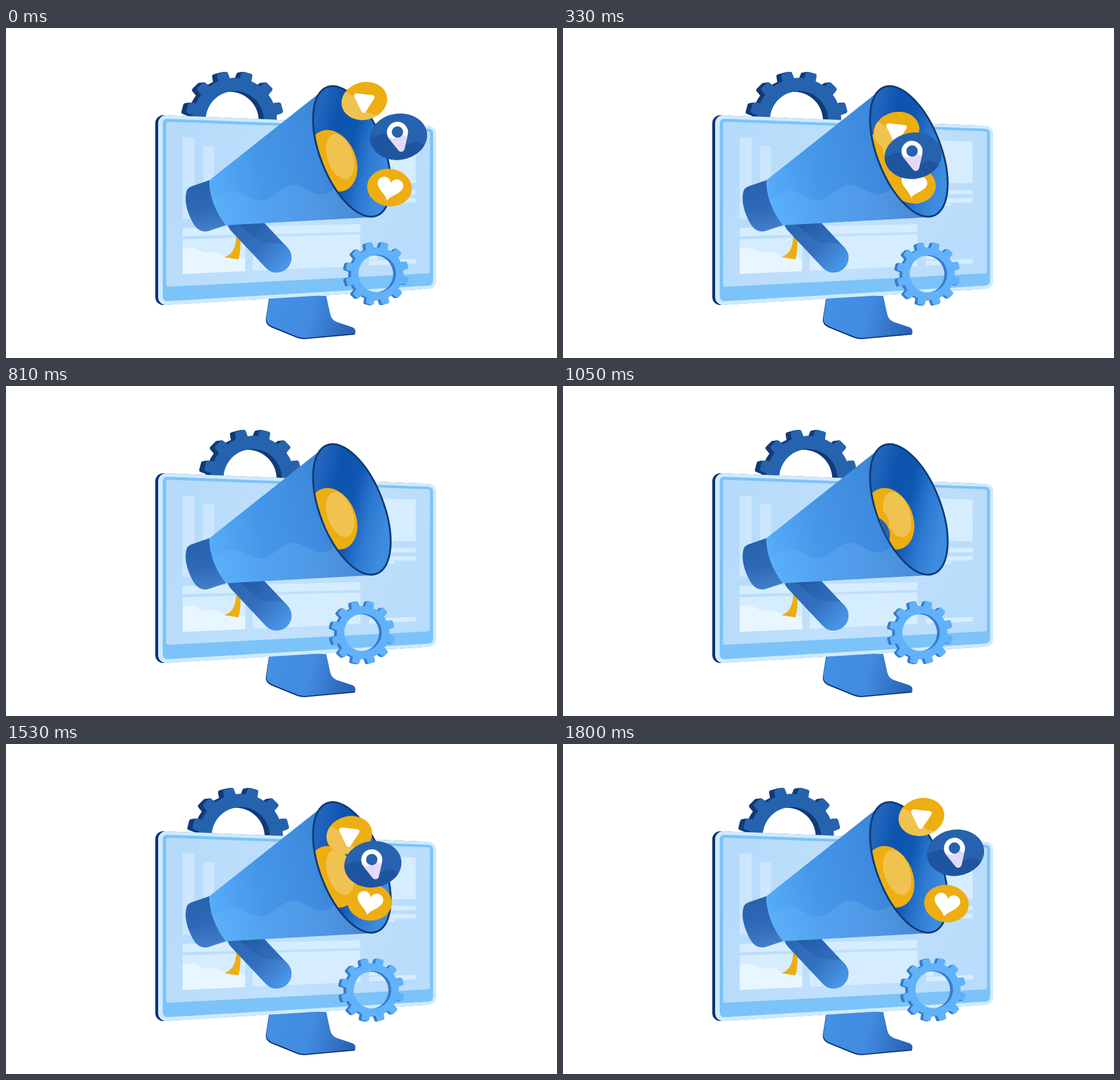
An HTML page with a canvas that plays this animation: 967 px wide and 579 px high, repeating every 1830 ms.

```html
<!DOCTYPE html>
<html lang="en">
<head>
<meta charset="utf-8">
<title>Megaphone</title>
<style>
html, body { margin: 0; width: 100%; height: 100%; overflow: hidden; background: #fff; }
canvas { display: block; }
</style>
</head>
<body>
<canvas id="stage" width="967" height="579"></canvas>
<script>
const ctx = document.getElementById('stage').getContext('2d');
const LOOP = 1830, STEP = 30, TAU = Math.PI * 2, DEG = Math.PI / 180;
const GOLD = '#edae12', GLOW = '#f0c24f', NAVY = '#0d3375', BLUE = '#2762ae';
const { sin, cos, hypot, atan2, acos } = Math;

function fill(shape, color) {
  ctx.fillStyle = color;
  ctx.fill(shape, 'evenodd');
}

function linear(x0, y0, x1, y1, ...colors) {
  const g = ctx.createLinearGradient(x0, y0, x1, y1);
  colors.forEach((c, i) => g.addColorStop(i / (colors.length - 1), c));
  return g;
}

function at(dx, dy, paint) {
  ctx.save();
  ctx.translate(dx, dy);
  paint();
  ctx.restore();
}

function within(shape, paint) {
  ctx.save();
  ctx.clip(shape);
  paint();
  ctx.restore();
}

function oval(x, y, a, b = a, deg = 0) {
  const p = new Path2D();
  p.ellipse(x, y, a, b, deg * DEG, 0, TAU);
  return p;
}

function roundPoly(r, points) {
  const p = new Path2D(), n = points.length;
  const [a, b] = [points[0], points[n - 1]];
  p.moveTo((a[0] + b[0]) / 2, (a[1] + b[1]) / 2);
  points.forEach((pt, i) => p.arcTo(...pt, ...points[(i + 1) % n], r));
  p.closePath();
  return p;
}

// Hull of two circles: a capsule or a drop
function hull(x0, y0, r0, x1, y1, r1) {
  const a = atan2(y1 - y0, x1 - x0);
  const b = acos((r0 - r1) / hypot(x1 - x0, y1 - y0));
  const p = new Path2D();
  p.arc(x0, y0, r0, a + b, a - b + TAU);
  p.arc(x1, y1, r1, a - b, a + b);
  p.closePath();
  return p;
}

// Paints the part of a shape that lies below the curve y = f(x)
function below(shape, x0, x1, f, color) {
  const p = new Path2D();
  for (let x = x0; x <= x1; x++) p.lineTo(x, f(x));
  p.lineTo(x1, 579);
  p.lineTo(x0, 579);
  within(shape, () => fill(p, color));
}

function gearShape(tip, body, hole, turn, toothHalf, round) {
  const p = new Path2D(), n = 12;
  const pt = (r, a) => [r * cos(a), r * sin(a)];
  const b = toothHalf * 1.12 / body, t = toothHalf / tip;
  for (let i = 0; i < n; i++) {
    const a = turn * DEG + i * TAU / n;
    p.lineTo(...pt(body, a - b));
    p.arcTo(...pt(tip, a - t), ...pt(tip, a + t), round);
    p.arcTo(...pt(tip, a + t), ...pt(body, a + b), round);
    p.arc(0, 0, body, a + b, a + TAU / n - b);
  }
  p.closePath();
  p.moveTo(hole, 0);
  p.arc(0, 0, hole, 0, TAU);
  return p;
}

function drawGear(shape, x, y, depth, side, face) {
  for (let d = depth; d > 0; d--) at(x - d, y + d * 0.15, () => fill(shape, side));
  at(x, y, () => fill(shape, face));
}

const bigGear = gearShape(86.5, 74, 51, 15, 9.5, 4);
const smallGear = gearShape(56, 46, 33, 14, 6.5, 2.5);

// Screen perspective: v runs from the top edge (0) to the bottom edge (1)
function screenY(x, v) {
  const u = (x - 267) / 488;
  const top = 152.5 + 19.5 * u;
  return top + (334.5 - 49.5 * u) * v;
}

function slab(x0, x1, v0, v1, r = 0) {
  return roundPoly(r, [[x0, v0], [x1, v0], [x1, v1], [x0, v1]].map(([x, v]) => [x, screenY(x, v)]));
}

const stand = new Path2D('M463 470H562L569 502Q571 512 581 516L608 525Q615 528 613 536L524 544Q517 544 510 541L466 523Q456 518 457 508Z');

function drawMonitor() {
  const pale = '#cbe6fe', light = '#d5edff';
  at(-1, 2, () => fill(stand, NAVY));
  fill(stand, linear(462, 495, 605, 530, '#4390e5', '#418be0', '#2964b5'));

  at(-5, 0, () => fill(slab(267, 745, 0, 1, 14), NAVY));
  fill(slab(267, 755, 0, 1, 14), '#cfeaff');
  fill(slab(275, 749.5, 0.018, 0.98, 8), '#7cc3f9');
  fill(slab(281, 744, 0.034, 0.904, 4), linear(282, 220, 744, 360, '#b5dafa', '#c1e1fc', '#b8dcfb'));

  fill(slab(310, 331, 0.115, 0.548), pale);
  fill(slab(346, 365, 0.157, 0.548), pale);
  fill(slab(640, 719, 0.099, 0.352), light);
  for (const v of [0.393, 0.442]) fill(slab(640, 719, v, v + 0.027), light);
  fill(slab(640, 681, 0.472, 0.489), light);
  fill(slab(310, 622, 0.595, 0.64), light);
  fill(slab(433, 622, 0.655, 0.84), light);
  fill(slab(637, 651, 0.785, 0.806), light);
  fill(slab(637, 719, 0.812, 0.84), light);

  const chart = slab(310, 420, 0.655, 0.84);
  fill(chart, light);
  below(chart, 310, 420, x => 384 + 0.19 * (x - 310) + 2 * sin(x / 6), '#e8f6ff');
}

const mouthOval = (a, b) => oval(607, 216.5, a, b, 68.8);
const mouth = mouthOval(121, 56), inside = mouthOval(119.5, 54.5);

// Opening of the horn plus everything to its right
const passage = new Path2D(inside);
passage.addPath(new Path2D('M563 103V0H967V579H651V330Z'));

const cone = new Path2D('M357 267L549 115Q565 99 607 216L640 332L386 346Q357 308 357 267Z');
const collar = new Path2D('M325 278L357 267Q357 308 386 346L356 356Q339 361 328 342Q312 312 316 290Q317 281 325 278Z');
const handle = hull(414, 338, 26, 475, 403, 26);
const ribbon = new Path2D('M404 364H411Q413 388 408 406L383 402Q404 396 404 364Z');

function drawHorn() {
  fill(ribbon, GOLD);
  fill(handle, linear(400, 340, 490, 425, '#21569f', '#2d6ab8', '#3979c8'));
  below(handle, 380, 505, x => 342 + 0.45 * (x - 390) + 6 * sin((x - 425) / 14),
    linear(400, 340, 490, 425, '#2c67b5', '#3370bf', '#4b99eb'));
  fill(collar, linear(340, 275, 355, 357, '#2863b0', '#2d69b6', '#447fc9'));
  fill(cone, linear(357, 290, 630, 225, '#57adf9', '#4697e9', '#3f8cdf', '#3677c7'));
  below(cone, 357, 640, x => 297 - 0.1 * (x - 395) - 11 * cos((x - 395) / 17),
    linear(365, 300, 630, 320, 'rgba(100,185,255,.3)', 'rgba(105,175,245,.38)', 'rgba(115,165,225,.28)'));

  fill(mouth, linear(540, 195, 672, 225, '#2165bd', '#0d53ae', '#0f57b2', '#2d79d0', '#3d8ce0'));
  within(inside, () => {
    fill(oval(574, 233, 56, 40, 67.3), GOLD);
    fill(oval(586.5, 225.5, 41, 22.5, 72), GLOW);
  });
  ctx.strokeStyle = '#0e3b75';
  ctx.lineWidth = 3.2;
  ctx.stroke(mouth);
}

function heart(x, y, size, deg) {
  const p = new Path2D(), c = cos(deg * DEG), s = sin(deg * DEG);
  for (let a = 0; a < TAU; a += 0.05) {
    const u = 16 * sin(a) ** 3 * size;
    const v = (5 * cos(2 * a) + 2 * cos(3 * a) + cos(4 * a) - 13 * cos(a)) * size;
    p.lineTo(x + u * c - v * s, y + u * s + v * c);
  }
  p.closePath();
  return p;
}

const playDisc = oval(629, 128, 40.5, 33, -14);
const playMark = roundPoly(4, [[608, 114], [650, 118.5], [627, 153]]);
const heartDisc = oval(673, 280, 39.3, 32.8, 8);
const heartMark = heart(673.5, 280, 1.42, 12);
const pinDisc = oval(689, 190.7, 50.3, 40.5, -8);
const pinMark = hull(687, 183, 18.5, 693.5, 211, 6);

function drawPlay() {
  fill(playDisc, GOLD);
  below(playDisc, 585, 672, x => 118 + 0.7 * (x - 600) + 5 * sin((x - 620) / 9), GLOW);
  fill(playMark, '#fff');
}

function drawHeart() {
  fill(heartDisc, GOLD);
  fill(heartMark, '#fff');
}

function drawPin() {
  fill(pinDisc, BLUE);
  below(pinDisc, 635, 742, x => 188 + 0.25 * (x - 650) + 6 * sin((x - 680) / 9), '#1f559f');
  fill(pinMark, '#fff');
  below(pinMark, 668, 706, x => 191 + 3 * sin((x - 672) / 5), '#e3d9fa');
  fill(oval(687, 182.5, 10), BLUE);
}

// k runs from 0 (icons out) to 1 (deep in the horn)
function drawIcons(k) {
  within(passage, () => {
    at(-119 * k, 143 * k, drawPlay);
    at(-158 * k, -13.5 * k, drawHeart);
    at(-203 * k, 91 * k, drawPin);
  });
}

function draw(t) {
  const slide = Math.max(0, 1 - Math.abs(t / 900 - 1));
  const pull = Math.max(0, t < 900 ? t / 900 : (1710 - t) / 810);

  ctx.fillStyle = '#fff';
  ctx.fillRect(0, 0, 967, 579);
  drawGear(bigGear, 401.5 + 34.8 * slide, 161.5, 9, '#123a78', '#2563ae');
  drawMonitor();
  drawHorn();
  drawIcons(pull);
  drawGear(smallGear, 651.5 - 27.6 * slide, 430.8 + 1.8 * slide, 5, '#387dca', '#61b2fa');
}

function tick() {
  const t = performance.now() % LOOP;
  draw(Math.floor(t / STEP) * STEP);
  requestAnimationFrame(tick);
}
tick();
</script>
</body>
</html>
```
